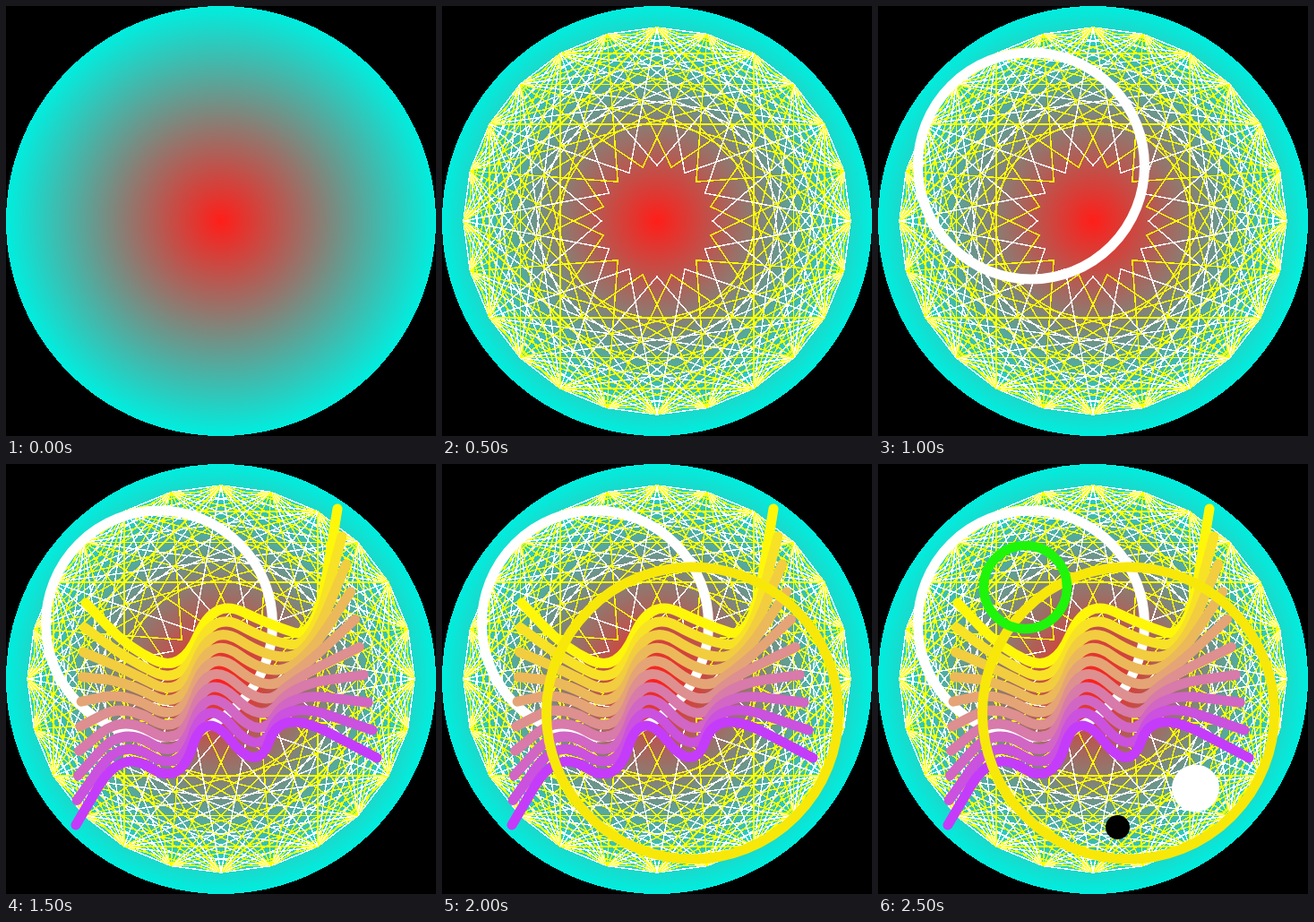
These frames come from a looping animation (480x480 px, 3000 ms). An HTML page:

```html
<!DOCTYPE html>
<html lang="en">
<head>
<meta charset="utf-8">
<title>Layered circles</title>
<style>
  html, body { margin: 0; width: 100%; height: 100%; overflow: hidden; background: #000; }
  svg { display: block; width: 480px; height: 480px; fill: none; }
  .layer { opacity: 0; }
  #mesh { stroke-width: 1.5; shape-rendering: crispEdges; }
  #waves { stroke-width: 11; stroke-linecap: round; stroke-linejoin: round; }
</style>
</head>
<body>
<svg viewBox="0 0 480 480">
  <defs>
    <radialGradient id="glow">
      <stop offset="0" stop-color="#ff1e19"/>
      <stop offset="1" stop-color="#00eedf"/>
    </radialGradient>
  </defs>
  <circle cx="240" cy="240" r="240" fill="url(#glow)" shape-rendering="crispEdges"/>
  <g class="layer" id="mesh"></g>
  <g class="layer"><circle cx="171" cy="178.5" r="126.5" stroke="#fff" stroke-width="11"/></g>
  <g class="layer" id="waves"></g>
  <g class="layer"><circle cx="279.5" cy="278" r="163" stroke="#f7e80a" stroke-width="11"/></g>
  <g class="layer">
    <circle cx="164.5" cy="137.5" r="46.5" stroke="#1ef50a" stroke-width="10.5"/>
    <circle cx="354.5" cy="362" r="26.5" fill="#fff"/>
    <circle cx="267.5" cy="405.5" r="13.5" fill="#000"/>
  </g>
</svg>
<script>
const LOOP = 3000, STEP = 500;
const COUNT = 24, OUTER = 216, INNER = 62;
const WHITE = '#fff', YELLOW = '#ffff00';

function addPath(parent, d, stroke) {
  const path = document.createElementNS('http://www.w3.org/2000/svg', 'path');
  path.setAttribute('d', d);
  path.setAttribute('stroke', stroke);
  parent.append(path);
}

function polar(i, r) {
  const a = i * 2 * Math.PI / COUNT;
  return (240 + r * Math.sin(a)).toFixed(2) + ' ' + (240 - r * Math.cos(a)).toFixed(2);
}

const mix = (a, b, t) => a + (b - a) * t;
const mixAll = (a, b, t) => a.map((v, i) => mix(v, b[i], t));

// Chords of every span, then the inward spikes
const mesh = document.getElementById('mesh');
for (let span = 1; span <= 8; span++) {
  let d = '';
  for (let i = 0; i < COUNT; i++) d += `M${polar(i, OUTER)}L${polar(i + span, OUTER)}`;
  addPath(mesh, d, span % 2 ? WHITE : YELLOW);
}
for (let i = 0; i < COUNT; i++) {
  addPath(mesh, `M${polar(i - 2, OUTER)}L${polar(i, INNER)}L${polar(i + 2, OUTER)}`,
    i % 2 ? YELLOW : WHITE);
}

// Straight ends, quadratic curves through the midpoints between
function smooth(pts) {
  let d = `M${pts[0]}`;
  for (let i = 1; i < pts.length; i++) {
    const mid = mixAll(pts[i - 1], pts[i], 0.5);
    d += i === 1 ? `L${mid}` : `Q${pts[i - 1]} ${mid}`;
  }
  return d + `L${pts[pts.length - 1]}`;
}

const waves = document.getElementById('waves');
const top0 = [[89, 155], [136, 205], [196, 233], [232, 150], [296, 180], [346, 196], [370, 50]];
const low0 = [[78, 403], [128, 318], [194, 360], [222, 272], [281, 346], [307, 272], [414, 328]];
for (let i = 0; i < 10; i++) {
  const t = i / 9;
  const pts = top0.map((p, n) => mixAll(p, low0[n], t));
  addPath(waves, smooth(pts), `rgb(${mixAll([255, 247, 10], [196, 60, 250], t).map(Math.round)})`);
}

// Layers appear one after another and clear together
document.querySelectorAll('.layer').forEach((layer, i) => {
  const anim = layer.animate([
    { opacity: 0, offset: 0, easing: 'steps(1, end)' },
    { opacity: 1, offset: (i + 1) * STEP / LOOP },
    { opacity: 1, offset: 1 }
  ], { duration: LOOP, iterations: Infinity });
  anim.startTime = document.timeline.currentTime;
});
</script>
</body>
</html>
```
